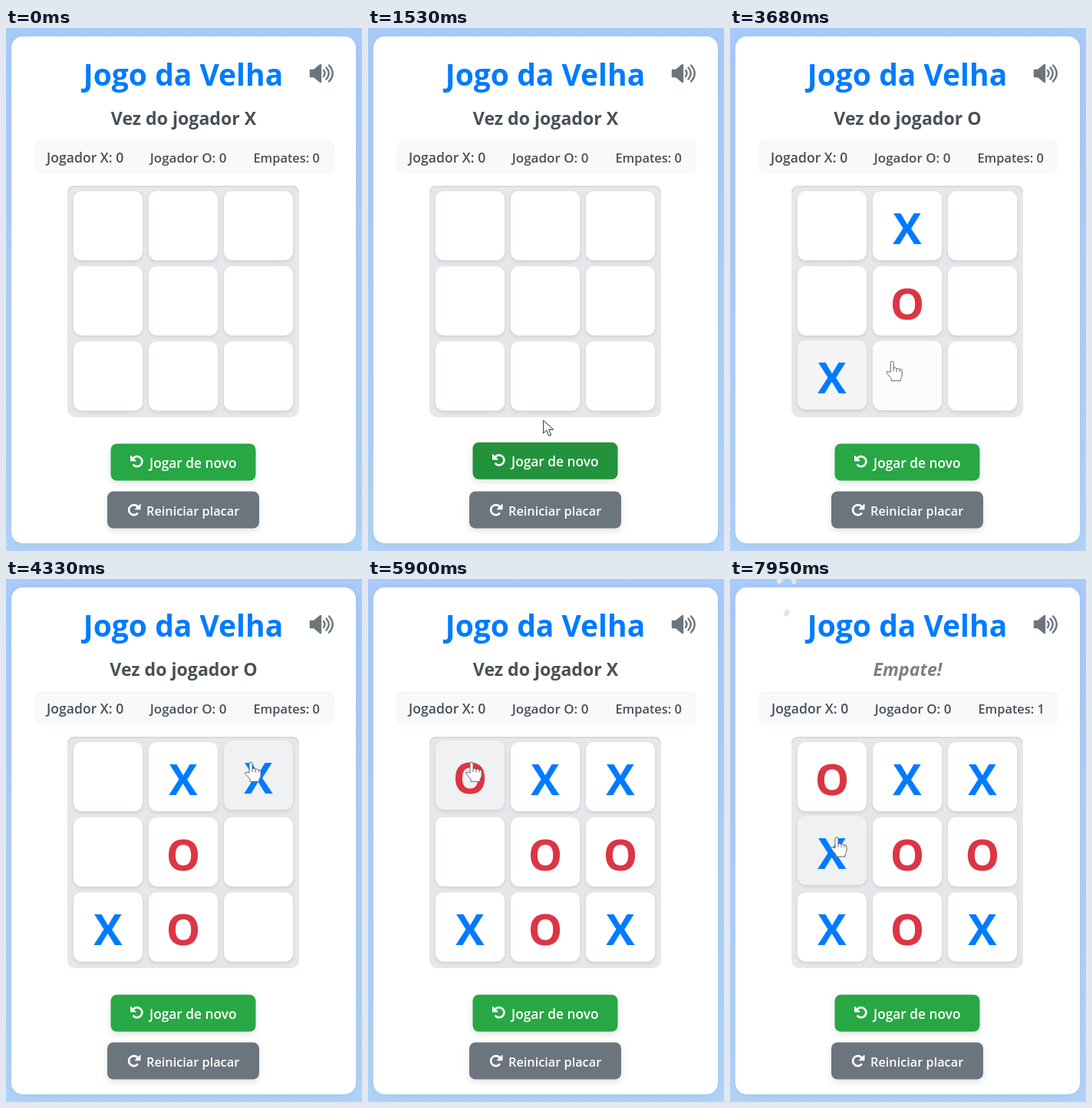
Animation of 464x680 px, one loop 8 s. Source, as an HTML page:

```html
<!DOCTYPE html>
<html lang="pt-BR">
<head>
<meta charset="utf-8">
<title>Jogo da Velha</title>
<style>
  html, body { margin: 0; height: 100%; overflow: hidden; background: #adcff8; }
  svg { display: block; width: 100vw; height: 100vh; font-family: "Open Sans", "Noto Sans", sans-serif; font-weight: 600; }
  text { white-space: pre; }
  .mid { text-anchor: middle; }
  .bold { font-weight: 700; }
  .panel { filter: drop-shadow(0 4px 8px rgba(0, 0, 0, .06)); }
  .cell rect { filter: drop-shadow(0 2px 2px rgba(0, 0, 0, .1)); }
  .mark { font-size: 56px; }
  .button rect { filter: drop-shadow(0 3px 4px rgba(0, 0, 0, .12)); }
  .button { fill: #fff; }
</style>
</head>
<body>
<svg viewBox="0 0 464 680" preserveAspectRatio="none">
  <defs>
    <linearGradient id="sky" x2="0" y2="1">
      <stop stop-color="#a9cbf9"/><stop offset="1" stop-color="#b1d4f8"/>
    </linearGradient>
    <g id="turn">
      <path d="M165.5 560A6.5 6.5 0 1 1 166.3 568.2" fill="none" stroke="#fff" stroke-width="2.7" stroke-linecap="round"/>
      <path d="M162.5 556v6.8h6.8z" fill="#fff" stroke="#fff" stroke-linejoin="round"/>
    </g>
  </defs>
  <rect width="464" height="680" fill="url(#sky)"/>
  <rect class="panel" x="7" y="11" width="449" height="659" rx="15" fill="#fff"/>
  <g id="confetti" fill="#e3e4e6"></g>

  <text class="mid bold" x="231" y="75" font-size="39" fill="#007bff">Jogo da Velha</text>
  <g fill="none" stroke="#6c757d" stroke-width="2.4" stroke-linecap="round" stroke-linejoin="round">
    <path d="M397 55h4.500l8.500-7v22l-8.500-7h-4.500z" fill="#6c757d"/>
    <path d="M414 55q3 4 0 8M417.500 51.500q6.500 7.500 0 15M421 48.500q9.500 10.500 0 21"/>
  </g>
  <text id="status" class="mid bold" x="231.5" y="126" font-size="23.1"></text>

  <rect x="37" y="147" width="391" height="42" rx="8" fill="#f8f9fa"/>
  <path d="M38 153q1-5.500 7-5.500h375q6 0 7 5.500" fill="none" stroke="#f1f2f4"/>
  <g id="scores" fill="#495057"></g>

  <rect x="80" y="205" width="302" height="301" rx="10" fill="#e6e7ea"/>
  <path d="M81 214q0-8 9-8h282q9 0 9 8" fill="none" stroke="#d8dade" stroke-width="2"/>
  <g id="board"></g>

  <g id="again" class="button">
    <rect x="136.500" y="540.500" width="189" height="48" rx="8"/>
    <use href="#turn"/>
    <text x="187" y="571.5" font-size="17.3">Jogar de novo</text>
  </g>
  <g id="reset" class="button">
    <rect x="132" y="602.500" width="198" height="48" rx="8"/>
    <use href="#turn" transform="translate(337.5 63) scale(-1 1)"/>
    <text x="183" y="633.5" font-size="16.3">Reiniciar placar</text>
  </g>

  <g id="cursor" fill="#fff" stroke-linejoin="round">
    <path id="arrow" stroke="#25283c" d="M0 0V17l4-4 3 7 3-1-3-7h6z"/>
    <g id="hand" stroke="#65686c">
      <path d="M-2 14V2a2 2 0 0 1 4 0v7q2-2 4 .5q2-1.500 4 .8q3-1 3 2v5q0 3-2 5v3H-1v-3l-6-7q-1-3 2-2z"/>
      <path d="M2 9v4M6 9.500v4M10 10.500v3" fill="none"/>
    </g>
  </g>
</svg>
<script>
const LOOP = 8000, FADE = 160, TRAVEL = 160, REST = 60, STEPS = 16;
const X_BLUE = '#007bff', O_RED = '#dc3545';

// Click times; X and O alternate
const clicks = [1707, 2480, 3200, 3764, 4300, 4800, 5173, 5800, 6480];
const order = [...'146725803'].map(Number);

const $ = id => document.getElementById(id);
const clamp = v => Math.max(0, Math.min(1, v));
const ease = k => k * k * (3 - 2 * k);
const mix = (a, b, k) => a.map((v, i) => v + (b[i] - v) * k);

function add(parent, tag, attrs) {
  const el = document.createElementNS('http://www.w3.org/2000/svg', tag);
  for (const key in attrs) el.setAttribute(key, attrs[key]);
  return parent.appendChild(el);
}

const cells = Array.from({ length: 9 }, (_, i) => {
  const x = 88 + 98 * (i % 3), y = 212 + 97.7 * Math.floor(i / 3);
  const el = add($('board'), 'g', { class: 'cell' });
  const rect = add(el, 'rect', { x, y, width: 90, height: 90, rx: 11 });
  const mark = add(el, 'text', { x: x + 45, y: y + 69, class: 'mid bold mark' });
  return { el, rect, mark, from: [255, 255, 255], to: [239, 241, 243] };
});
const buttons = [
  { el: $('again'), from: [40, 167, 69], to: [34, 143, 60] },
  { el: $('reset'), from: [108, 117, 125], to: [90, 98, 104] }
];
const targets = [...cells, ...buttons];
for (const target of targets) {
  target.rect = target.el.querySelector('rect');
  target.box = ['x', 'y', 'width', 'height'].map(key => +target.rect.getAttribute(key));
}

const scores = [0, 1, 2].map(i => add($('scores'), 'text', { y: 174.5, 'font-size': 17.6 - .6 * i }));
const confetti = [0, 1, 2].map(() => add($('confetti'), 'rect', { x: -3, y: -4, width: 6, height: 8 }));

// The pointer crosses the button, then reaches each cell just before its click
const stops = [
  { arrive: 1340, at: [234, 572] },
  ...clicks.map((time, i) => {
    const [x, y] = cells[order[i]].box;
    return { arrive: time - REST, at: [x + 19 + 4 * i, y + 26] };
  })
];

const pointer = t => stops.reduce(
  (pos, { arrive, at }) => mix(pos, at, ease(clamp((t - arrive) / TRAVEL + 1))), [230, 700]);

const inside = ([px, py], [x, y, w, h]) => px >= x && px <= x + w && py >= y && py <= y + h;

function showHover(t) {
  // A linear transition equals the share of recent time spent inside
  const trail = Array.from({ length: STEPS }, (_, k) => pointer(t - k * FADE / STEPS));
  for (const { el, rect, box, from, to } of targets) {
    const hover = trail.filter(p => inside(p, box)).length / STEPS;
    el.setAttribute('transform', `translate(0 ${-2 * hover})`);
    rect.setAttribute('fill', `rgb(${mix(from, to, hover).map(Math.round)})`);
  }
  const over = targets.some(target => inside(trail[0], target.box));
  $('cursor').setAttribute('transform', `translate(${trail[0]})`);
  $('arrow').setAttribute('visibility', over ? 'hidden' : 'visible');
  $('hand').setAttribute('visibility', over ? 'visible' : 'hidden');
}

function showGame(t) {
  order.forEach((cell, n) => {
    const { mark } = cells[cell];
    mark.textContent = t < clicks[n] ? '' : n % 2 ? 'O' : 'X';
    mark.setAttribute('fill', n % 2 ? O_RED : X_BLUE);
  });

  const played = clicks.filter(time => time <= t).length;
  const draw = played === clicks.length;
  const status = $('status');
  status.textContent = draw ? 'Empate!' : 'Vez do jogador ' + (played % 2 ? 'O' : 'X');
  status.setAttribute('fill', draw ? '#808080' : '#495057');
  status.setAttribute('font-style', draw ? 'italic' : 'normal');
  status.setAttribute('opacity', draw ? clamp((t - 6540) / 800) : 1);

  ['Jogador X: 0', 'Jogador O: 0', 'Empates: ' + Number(draw)].forEach((label, i) => {
    scores[i].textContent = label;
    scores[i].setAttribute('x', 53 + 134.7 * i + draw);
  });
}

function showConfetti(t) {
  const dt = t - 7950;
  confetti.forEach((el, i) => {
    const y = 2 + 42 * (i % 2) + dt * .3;
    el.setAttribute('transform', `translate(${65 + 9 * i} ${y}) rotate(${60 - 40 * i + dt * .3})`);
    el.setAttribute('visibility', dt > -200 ? 'visible' : 'hidden');
  });
}

const start = performance.now();
function tick() {
  const t = (performance.now() - start) % LOOP;
  showHover(t);
  showGame(t);
  showConfetti(t);
  requestAnimationFrame(tick);
}
tick();
</script>
</body>
</html>
```
